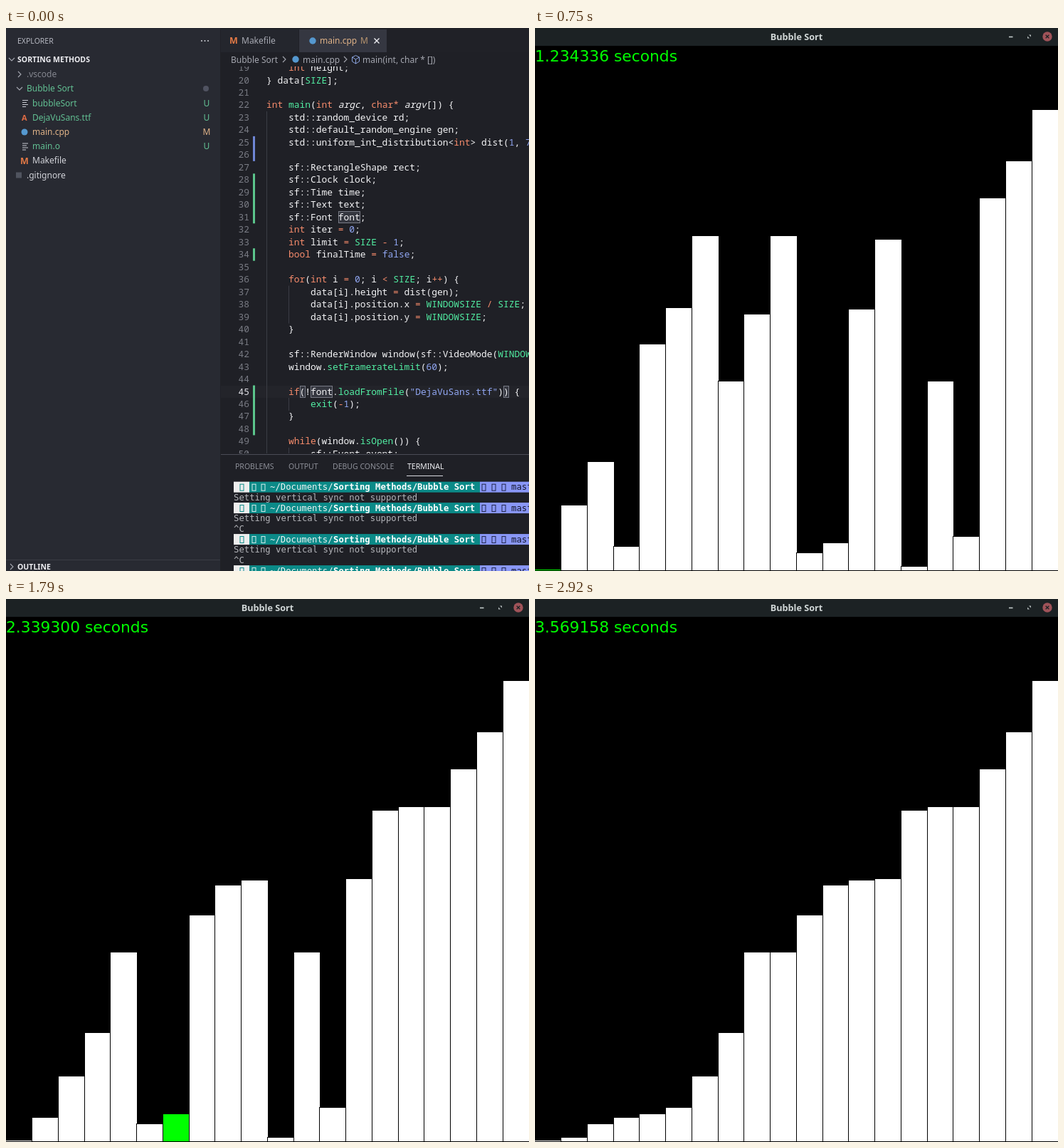
An HTML page that plays this animation: 735 by 762 pixels, repeating every 3.43 s.

```html
<!DOCTYPE html>
<html lang="en">
<head>
<meta charset="utf-8">
<title>Bubble Sort</title>
<style>
html, body { margin: 0; width: 100%; height: 100%; overflow: hidden; background: #000; }
svg { display: block; width: 735px; height: 762px; }
text { white-space: pre; }
.ui { font-family: "Noto Sans", sans-serif; }
.code { font-family: "Noto Sans Mono", monospace; font-size: 12.92px; }
.term { font-family: "DejaVu Sans Mono", monospace; font-size: 12.25px; }
.clock { font-family: "DejaVu Sans", sans-serif; font-size: 21.8px; }
.param { font-style: italic; }
#bars rect { stroke: #000; stroke-width: 2; paint-order: stroke; shape-rendering: crispEdges; }
</style>
</head>
<body>
<svg viewBox="0 0 735 762">
  <defs>
    <clipPath id="codeArea"><rect x="302" y="54" width="433" height="543"/></clipPath>
  </defs>
  <g id="editor"></g>
  <g id="sorter">
    <rect width="735" height="762" fill="#000"/>
    <rect width="735" height="25" fill="#1c2224"/>
    <text class="ui" x="367.5" y="16.5" font-size="12.7" font-weight="600" text-anchor="middle" fill="#d0d6d6">Bubble Sort</text>
    <path d="M666 12.5h5.5" stroke="#c4cccc" stroke-width="1.6"/>
    <path d="M694 9.5h3v3zM692 11.500v3h3z" fill="#b4bcbc"/>
    <circle cx="720" cy="12" r="6.7" fill="#a05359"/>
    <path d="M717.700 9.700l4.600 4.600m0-4.600l-4.600 4.600" stroke="#1c2224" stroke-width="1.300"/>
    <g id="bars"></g>
    <text id="clock" class="clock" x="0" y="47" fill="#0f0"></text>
  </g>
</svg>
<script>
const LOOP = 3430, WINDOW_AT = 30, FLOOR = 761, BAR_WIDTH = 36.75;
const $ = id => document.getElementById(id);

// ---------- Editor ----------
const ORANGE = '#f78c6c', GREEN = '#52eea3', BLUE = '#91a7f3', PALE = '#f4f4f6', MUTED = '#a5a7b0';
const UI_SIZE = 12, CAPS_SIZE = 10.5;
const escapeText = s => s.replace(/&/g, '&amp;').replace(/</g, '&lt;');
const rect = (x, y, w, h, fill, extra = '') =>
  `<rect x="${x}" y="${y}" width="${w}" height="${h}" fill="${fill}" ${extra}/>`;
const path = (d, stroke, width = 1) =>
  `<path d="${d}" fill="none" stroke="${stroke}" stroke-width="${width}"/>`;
const dot = (x, y, r, fill) => `<circle cx="${x}" cy="${y}" r="${r}" fill="${fill}"/>`;
const label = (x, y, s, fill, size = UI_SIZE, extra = '', kind = 'ui') =>
  `<text class="${kind}" x="${x}" y="${y}" fill="${fill}" font-size="${size}" ${extra}>${escapeText(s)}</text>`;
const chevron = (x, y, down) => path(down ? `M${x - 4} ${y - 2}l4 4l4-4` : `M${x - 2} ${y - 4}l4 4l-4 4`, MUTED, 1.1);

const SOURCE = `    int height;
} data[SIZE];

int main(int argc, char* argv[]) {
    std::random_device rd;
    std::default_random_engine gen;
    std::uniform_int_distribution<int> dist(1, 700);

    sf::RectangleShape rect;
    sf::Clock clock;
    sf::Time time;
    sf::Text text;
    sf::Font font;
    int iter = 0;
    int limit = SIZE - 1;
    bool finalTime = false;

    for(int i = 0; i < SIZE; i++) {
        data[i].height = dist(gen);
        data[i].position.x = WINDOWSIZE / SIZE;
        data[i].position.y = WINDOWSIZE;
    }

    sf::RenderWindow window(sf::VideoMode(WINDOWSIZE
    window.setFramerateLimit(60);

    if(!font.loadFromFile("DejaVuSans.ttf")) {
        exit(-1);
    }

    while(window.isOpen()) {
        sf::Event event;`.split('\n');

const TOKENS = [
  [/"[^"]*"|\b\d+\b|\bfalse\b/, `fill="${BLUE}"`],
  [/\b(?:int|char|bool|for|if|while)\b|\+\+| [=\/<-] |\*|-(?=\d)/, `fill="${ORANGE}"`],
  [/\b(?:main|setFramerateLimit|loadFromFile|exit|isOpen|SIZE|WINDOWSIZE)\b/, `fill="${GREEN}"`],
  [/\barg[cv]\b/, 'class="param"']
];
const TOKEN = new RegExp(TOKENS.map(([re]) => `(${re.source})`).join('|'), 'g');
const span = (word, style) => `<tspan ${style}>${escapeText(word)}</tspan>`;

function highlight(line) {
  let out = '', last = 0;
  for (const match of line.matchAll(TOKEN)) {
    const kind = match.slice(1).findIndex(Boolean);
    out += escapeText(line.slice(last, match.index)) + span(match[0], TOKENS[kind][1]);
    last = match.index + match[0].length;
  }
  return out + escapeText(line.slice(last));
}

const lineY = n => 77.5 + (n - 20) * 17.48;

function codeView() {
  let out = rect(302, 502, 433, 17, '#23242a');
  for (const [x, from, to] of [[366.5, 23, 50], [397.5, 37, 39], [397.5, 46, 46], [397.5, 50, 50]])
    out += path(`M${x} ${lineY(from) - 13}V${lineY(to) + 5}`, '#3b3d45');
  for (const [from, to, fill] of [[25, 26, '#6f86d6'], [28, 31, '#5bc58b'], [34, 34, '#5bc58b'], [45, 48, '#5bc58b']])
    out += rect(347, lineY(from) - 13, 3, (to - from + 1) * 17.48, fill);
  for (const [x, y, w] of [[467, 257, 31], [428, 502, 31], [413, 502, 8], [699, 502, 8]])
    out += rect(x + .5, y + .5, w - 1, 16, '#34363f', 'stroke="#777a85"');
  SOURCE.forEach((line, i) => {
    const n = i + 19, y = lineY(n);
    out += label(342, y, String(n), n === 45 ? '#e0e0e6' : '#797b84', 13, 'text-anchor="end"', 'code');
    out += `<text class="code" x="366" y="${y}" fill="${PALE}">${highlight(line)}</text>`;
  });
  return `<g clip-path="url(#codeArea)">${out}</g>`;
}

function sidebar() {
  const files = [
    [65, 29, '.vscode', '#858790'], [85, 29, 'Bubble Sort', '#62c093'],
    [105.5, 37, 'bubbleSort', '#62c093', 'U'], [125.5, 37, 'DejaVuSans.ttf', '#62c093', 'U'],
    [146, 37, 'main.cpp', '#dfb287', 'M'], [166, 37, 'main.o', '#62c093', 'U'],
    [186, 37, 'Makefile', '#d2d3d9'], [206.5, 29, '.gitignore', '#d2d3d9']
  ];
  let out = rect(0, 0, 301, 762, '#282a32') +
    label(16, 22, 'EXPLORER', '#b5b7c0', CAPS_SIZE) +
    [275, 279.5, 284].map(x => dot(x, 18, 1.1, '#c5c6cc')).join('') +
    chevron(8, 44, true) + label(16, 48, 'SORTING METHODS', '#eeeef2', CAPS_SIZE, 'font-weight="700"') +
    chevron(19, 65) + chevron(19, 85, true) + dot(281, 85, 4, '#505361');
  for (const [y, x, name, fill, badge] of files) {
    out += label(x, y + 4, name, fill);
    if (badge) out += label(282, y + 4, badge, fill, UI_SIZE, 'text-anchor="middle"');
  }
  for (const y of [105.5, 166])
    out += path(`M23 ${y - 4}h8M23 ${y - 1}h6M23 ${y + 2}h8M23 ${y + 5}h5`, '#c8cad1', 1.2);
  return out + label(22, 129.5, 'A', '#e06c45', 11, 'font-weight="700"') +
    dot(26, 146, 4.5, '#5598cf') +
    label(20, 190.5, 'M', '#e27946', 12.5, 'font-weight="800"') +
    rect(14, 202.5, 8, 8, '#50545f') +
    path('M0 746.5H301', '#3a3c45') + chevron(8, 756) +
    label(16, 760, 'OUTLINE', '#eeeef2', CAPS_SIZE, 'font-weight="700"');
}

function tabs() {
  return rect(301, 0, 434, 762, '#1f2026') + rect(301, 0, 434, 34, '#202127') +
    rect(302, 2, 109, 32, '#24262d') + rect(412, 2, 123, 32, '#353741') +
    label(314, 22, 'M', '#e27946', 12.5, 'font-weight="800"') + label(331, 22, 'Makefile', '#a7a9b2') +
    dot(431, 18, 4.7, '#5598cf') + label(441, 22, 'main.cpp', '#dfb287') + label(498, 22, 'M', '#b9956f') +
    path('M517.5 14.500l7 7m0-7l-7 7', '#f0f0f4', 1.4) +
    label(316, 48.5, 'Bubble Sort', MUTED) + chevron(391, 44) +
    dot(407, 44, 4.7, '#5598cf') + label(417, 48.5, 'main.cpp', MUTED) + chevron(477, 44) +
    path('M491.500 38.500l5 2.500v6l-5 3l-5-3v-6zM486.500 41l5 3l5-3m-5 3v6', '#8ba4df') +
    label(501, 48.5, 'main(int, char * [])', MUTED);
}

function terminal() {
  const TEAL = '#0b8a88', VIOLET = '#8997f7';
  const mono = (x, y, s, fill, extra = '') => label(x, y, s, fill, 12.25, extra, 'term');
  const glyph = (x, y, stroke) => rect(x - 2.5, y - 4, 5, 9, 'none', `stroke="${stroke}"`);
  const prompt = y => rect(320, y - 7.5, 22, 15, '#ededed') + rect(342, y - 7.5, 324, 15, TEAL) +
    rect(666, y - 7.5, 69, 15, VIOLET) + glyph(331.5, y, TEAL) +
    [348.5, 361.5].map(x => glyph(x, y, '#d6eeee')).join('') +
    [671.5, 685.5, 699.5].map(x => glyph(x, y, '#22264a')).join('') +
    mono(371, y + 4, '~/Documents/', '#f2f6f6') +
    mono(460, y + 4, 'Sorting Methods/Bubble Sort', '#fff', 'font-weight="700"') +
    mono(710, y + 4, 'master', '#14172c');
  const rows = 'pspscpscp';
  let out = rect(302, 598, 433, 164, '#1f2026') + path('M302 598.5H735', '#4a4c56');
  for (const [x, name] of [[322, 'PROBLEMS'], [397, 'OUTPUT'], [459, 'DEBUG CONSOLE'], [564, 'TERMINAL']])
    out += label(x, 619, name, x === 564 ? '#f0f0f4' : '#8c8e97', CAPS_SIZE);
  out += path('M563 628.5H614', '#d8d9e0');
  [...rows].forEach((kind, i) => {
    const y = 644.2 + i * 14.67;
    out += kind === 'p' ? prompt(y)
      : mono(320, y + 4, kind === 's' ? 'Setting vertical sync not supported' : '^C', '#b4b5ba');
  });
  return out;
}

$('editor').innerHTML = tabs() + codeView() + terminal() + sidebar();

// ---------- Sorting ----------
const START = [1, 91, 368, 317, 152, 33, 469, 469, 522, 574, 265, 359, 646, 24, 38, 366, 464, 5, 265, 47];
const FIRST_STEP = 8, LAST_STEP = 190;

// Screen refreshes: [first ms, spacing, count]
const ticks = [[30, 30, 9], [320, 30, 7], [540, 30, 19], [1110, 460 / 12, 13], [1670, 30, 5], [1850, 30, 12], [2230, 30, 24]]
  .flatMap(([at, gap, count]) => Array.from({ length: count }, (_, i) => at + i * gap));

// Progress: [refresh, comparison, clock]
const PROGRESS = [
  [0, 8, .459318], [8, 24, .725985], [23, 54, 1.234336], [35, 77, 1.62302], [47, 104, 2.100417],
  [48, 110, 2.205963], [52, 118, 2.3393], [53, 121, 2.404281], [65, 145, 2.804287], [88, 190, 3.569158]
];

function progressAt(ms) {
  const tick = Math.max(0, ticks.findLastIndex(t => t <= ms + .01));
  const next = Math.max(1, PROGRESS.findIndex(p => p[0] >= tick));
  const a = PROGRESS[next - 1], b = PROGRESS[next];
  const k = (tick - a[0]) / (b[0] - a[0]);
  const mix = i => a[i] + (b[i] - a[i]) * k;
  return { step: Math.ceil(mix(1) - 1e-6), clock: mix(2) };
}

// The highlighted bar is the left one of the pair that was just compared.
function sortTo(step) {
  const data = [...START];
  let iter = FIRST_STEP, limit = data.length - 1, active = -1;
  for (let s = FIRST_STEP; s <= step && limit > 0; s++) {
    active = iter;
    if (data[iter] > data[iter + 1]) [data[iter], data[iter + 1]] = [data[iter + 1], data[iter]];
    if (++iter === limit) { iter = 0; limit--; }
  }
  return { data, active: step < LAST_STEP ? active : -1 };
}

const bars = START.map((_, i) => {
  const bar = document.createElementNS('http://www.w3.org/2000/svg', 'rect');
  const left = Math.ceil(i * BAR_WIDTH), right = Math.ceil((i + 1) * BAR_WIDTH);
  bar.setAttribute('x', left);
  bar.setAttribute('width', right - left);
  return $('bars').appendChild(bar);
});

function render(ms) {
  const sorting = ms >= WINDOW_AT;
  $('editor').style.display = sorting ? 'none' : '';
  $('sorter').style.display = sorting ? '' : 'none';
  if (!sorting) return;
  const { step, clock } = progressAt(ms);
  const { data, active } = sortTo(step);
  bars.forEach((bar, i) => {
    bar.setAttribute('y', FLOOR - data[i]);
    bar.setAttribute('height', data[i]);
    bar.setAttribute('fill', i === active ? '#0f0' : '#fff');
  });
  $('clock').textContent = clock.toFixed(6) + ' seconds';
}

function loop() {
  render(performance.now() % LOOP);
  requestAnimationFrame(loop);
}
loop();
</script>
</body>
</html>
```
